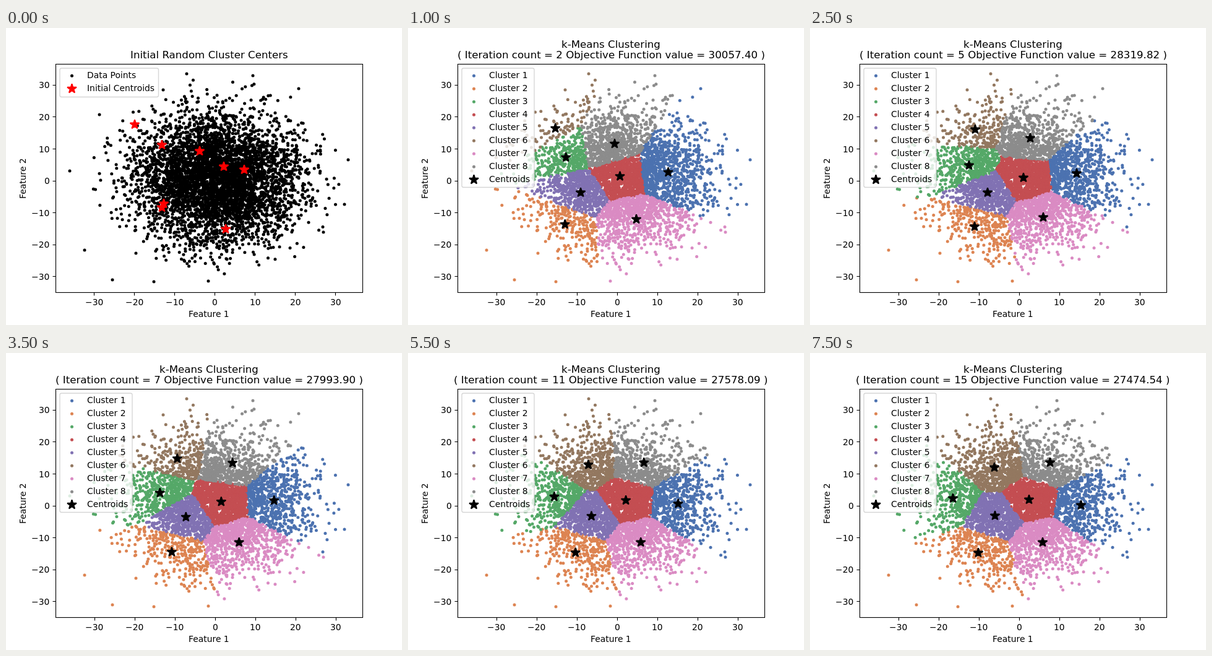
An HTML page with a canvas for the animation above (8 s loop, 640 by 480 pixels).

```html
<!DOCTYPE html>
<html lang="en">
<head>
<meta charset="utf-8">
<title>k-Means Clustering</title>
<style>
html, body { margin: 0; width: 640px; height: 480px; overflow: hidden; background: #fff; }
canvas { display: block; }
</style>
</head>
<body>
<canvas id="plot" width="640" height="480"></canvas>
<script>
const ctx = document.getElementById('plot').getContext('2d');
const STEP = 500, STEPS = 16;
const UNIT_X = 6.5, UNIT_Y = 5.16; // pixels per data unit

// Each centroid runs through four points, reached at these iterations
const STOPS = [0, 1, 5, 15];
const CLUSTERS = [
  { color: '#4c72b0', path: [[385, 229], [414, 232], [431, 235], [438, 246]] },
  { color: '#dd8452', path: [[252, 290], [246, 315], [266, 321], [272, 323]] },
  { color: '#55a868', path: [[252, 189], [254, 201], [257, 222], [231, 235]] },
  { color: '#c44e52', path: [[352, 224], [341, 238], [345, 242], [354, 237]] },
  { color: '#8172b3', path: [[255, 284], [274, 266], [287, 266], [299, 263]] },
  { color: '#937860', path: [[208, 156], [220, 161], [267, 164], [298, 185]] },
  { color: '#da8bc3', path: [[355, 325], [364, 311], [377, 306], [376, 306]] },
  { color: '#8c8c8c', path: [[313, 199], [320, 193], [356, 178], [388, 177]] }
];
const OBJECTIVE = [[1, 31181.45], [3, 28933.36], [5, 28319.82], [9, 27667.97], [11, 27578.09], [15, 27474.54]];
const EXTREMES = [[103, 231], [127, 359], [151, 140], [172, 407], [239, 410], [327, 409],
  [292, 74], [399, 77], [473, 98], [553, 213], [547, 285], [513, 330]];

const mix = (a, b, f) => a + (b - a) * f;
const easeOut = f => 1 - (1 - f) ** 1.7;

// Index of the segment of `stops` that holds n, and how far n is along it
function locate(stops, n) {
  const i = Math.max(1, stops.findIndex(s => s >= n));
  return [i, (n - stops[i - 1]) / (stops[i] - stops[i - 1])];
}

function centroidsAt(n) {
  const [i, f] = locate(STOPS, n);
  return CLUSTERS.map(({ path }) => path[i].map((v, k) => mix(path[i - 1][k], v, easeOut(f))));
}

function objectiveAt(n) {
  const [i, f] = locate(OBJECTIVE.map(o => o[0]), n);
  return mix(OBJECTIVE[i - 1][1], OBJECTIVE[i][1], f).toFixed(2);
}

function random(seed) {
  return () => {
    seed = seed + 0x6D2B79F5 | 0;
    let t = Math.imul(seed ^ seed >>> 15, 1 | seed);
    t = t + Math.imul(t ^ t >>> 7, 61 | t) ^ t;
    return ((t ^ t >>> 14) >>> 0) / 4294967296;
  };
}

function makePoints() {
  const rnd = random(11), points = [...EXTREMES];
  while (points.length < 5000) {
    const r = Math.sqrt(-2 * Math.log(1 - rnd())), a = 2 * Math.PI * rnd();
    if (r < 3.15) points.push([340 + 65 * r * Math.cos(a), 243 + 51.5 * r * Math.sin(a)]);
  }
  return points;
}

function nearest([x, y], centers) {
  const dist = centers.map(([cx, cy]) => Math.hypot((x - cx) / UNIT_X, (y - cy) / UNIT_Y));
  return dist.indexOf(Math.min(...dist));
}

function dot(x, y, color) {
  ctx.fillStyle = color;
  ctx.beginPath();
  ctx.arc(x, y, 2.5, 0, 7);
  ctx.fill();
}

function star(x, y, color) {
  ctx.beginPath();
  for (let i = 0; i < 10; i++) {
    const r = i % 2 ? 3 : 7.8, a = i * Math.PI / 5;
    ctx.lineTo(x + r * Math.sin(a), y - r * Math.cos(a));
  }
  ctx.closePath();
  ctx.fillStyle = ctx.strokeStyle = color;
  ctx.lineWidth = 2;
  ctx.lineJoin = 'bevel';
  ctx.fill();
  ctx.stroke();
}

// Text starts on whole pixels; align is the share of its width left of x
function text(str, x, y, align = 0.5, size = 13.89) {
  ctx.font = `${size}px "DejaVu Sans", sans-serif`;
  ctx.fillStyle = '#000';
  ctx.fillText(str, Math.round(x - align * ctx.measureText(str).width), Math.round(y));
}

const title = (str, y) => text(str, 328, y, 0.5, 16.67);

function axes(first) {
  ctx.strokeStyle = '#000';
  ctx.lineWidth = 1.11;
  ctx.lineJoin = 'miter';
  ctx.strokeRect(80.5, 58.5, 496, 369);
  ctx.beginPath();
  for (let i = -3; i <= 3; i++) {
    const x = (first ? 337.5 : 338) + 65 * i, y = 247 - 51.6 * i;
    const label = (i < 0 ? '\u2212' : '') + Math.abs(i * 10);
    const tx = Math.floor(x) + 0.5, ty = Math.floor(y) + 0.5;
    ctx.moveTo(tx, 428);
    ctx.lineTo(tx, 432.5);
    ctx.moveTo(80, ty);
    ctx.lineTo(75.5, ty);
    text(label, x, 448);
    text(label, 70.5, y + 5.2, 1);
  }
  ctx.stroke();
  text('Feature 1', 328, 467);
  ctx.save();
  ctx.translate(32, 243);
  ctx.rotate(-Math.PI / 2);
  text('Feature 2', 0, 0);
  ctx.restore();
}

function legend(width, rows) {
  ctx.beginPath();
  ctx.roundRect(87, 65, width, 4.8 + 20.86 * rows.length, 2.8);
  ctx.fillStyle = 'rgba(255,255,255,.8)';
  ctx.strokeStyle = 'rgba(204,204,204,.8)';
  ctx.lineWidth = 1.39;
  ctx.fill();
  ctx.stroke();
  rows.forEach(([label, mark, color], i) => {
    mark(106.5, 77.2 + 21 * i, color);
    text(label, 131, 81 + 21 * i, 0);
  });
}

const points = makePoints();

function draw(n) {
  ctx.fillStyle = '#fff';
  ctx.fillRect(0, 0, 640, 480);
  const centers = centroidsAt(n);
  if (n === 0) {
    points.forEach(([x, y]) => dot(x, y, '#000'));
    centers.forEach(([x, y]) => star(x, y, '#f00'));
    axes(true);
    legend(159.5, [['Data Points', dot, '#000'], ['Initial Centroids', star, '#f00']]);
    title('Initial Random Cluster Centers', 49);
    return;
  }
  // Points belong to the centroids of the step before
  const before = centroidsAt(n - 1), groups = CLUSTERS.map(() => []);
  points.forEach(p => groups[nearest(p, before)].push(p));
  groups.forEach((group, i) => group.forEach(([x, y]) => dot(x, y, CLUSTERS[i].color)));
  centers.forEach(([x, y]) => star(x, y, '#000'));
  axes(false);
  legend(117, [...CLUSTERS.map(({ color }, i) => ['Cluster ' + (i + 1), dot, color]), ['Centroids', star, '#000']]);
  title('k-Means Clustering', 32);
  title(`( Iteration count = ${n} Objective Function value = ${objectiveAt(n)} )`, 49);
}

let shown = -1;
function tick() {
  const n = Math.floor(performance.now() / STEP) % STEPS;
  if (n !== shown) draw(shown = n);
  requestAnimationFrame(tick);
}
tick();
</script>
</body>
</html>
```
